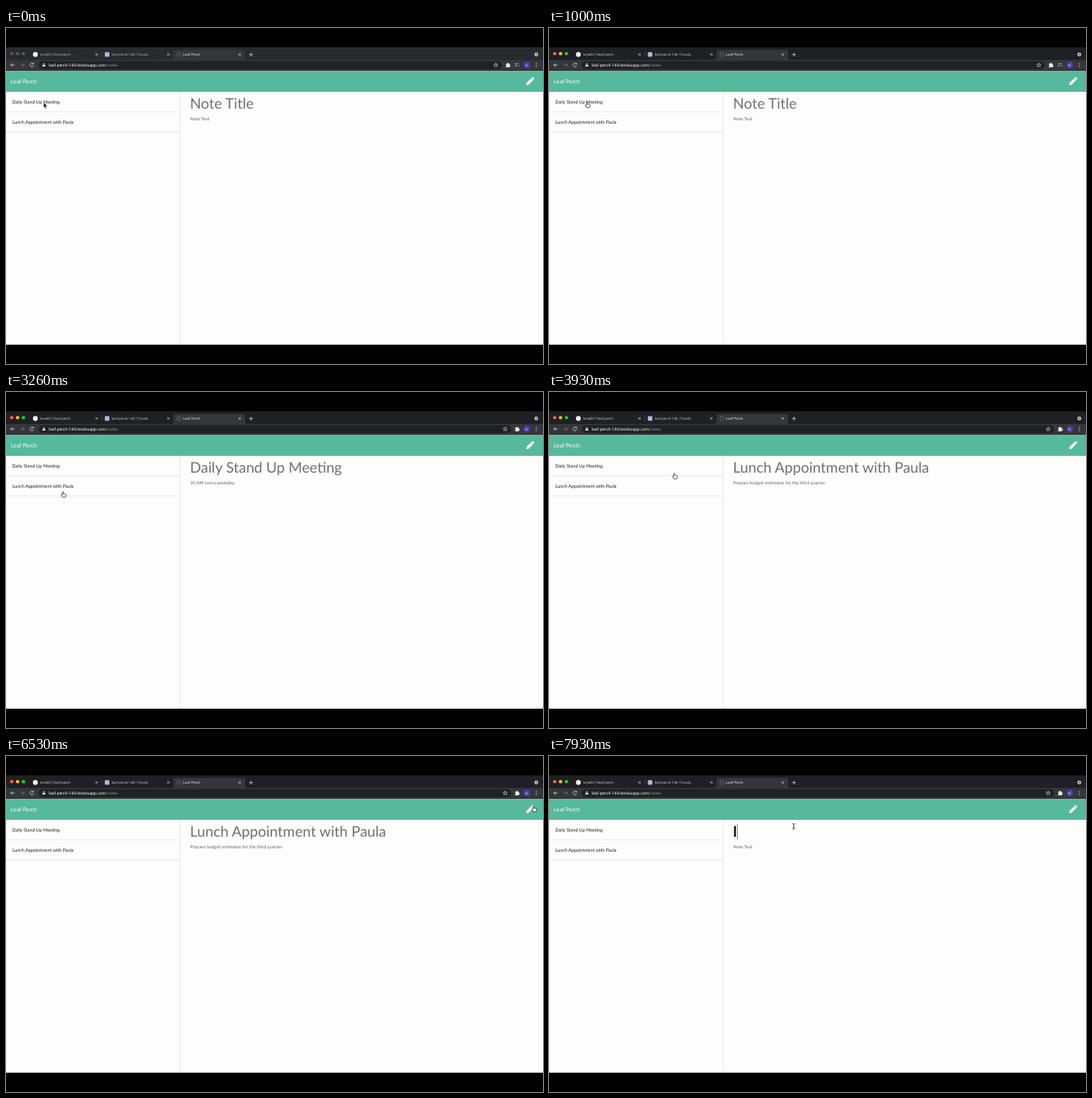
These frames come from a looping animation (640 px wide and 400 px high, 8 s). An HTML page:

```html
<!DOCTYPE html>
<html lang="en">
<head>
<meta charset="utf-8">
<title>Leaf Perch</title>
<style>
html, body { margin: 0; width: 100%; height: 100%; overflow: hidden; background: #000; }
svg { display: block; width: 640px; height: 400px; }
text { text-rendering: geometricPrecision; white-space: pre; font-family: Lato, sans-serif; }
.ui { font: 4.3px Roboto, sans-serif; fill: #bfc1c5; }
.url { font-size: 5px; fill: #f4f5f6; }
.item { font-size: 5.44px; fill: #1c1c1c; }
.title { font-size: 17.4px; fill: #707070; }
.title.typed { fill: #000; stroke: #000; stroke-width: .3; }
.note { font-size: 5.44px; fill: #686868; }
.line { fill: none; stroke: #d5d7da; stroke-width: .75; }
.asleep .strip { fill: #292a2d; }
.asleep .light { fill: #56575a; }
.asleep .ui:not(.url) { fill: #a5a7ab; }
.asleep .back { stroke: #8c8e92; }
</style>
</head>
<body>
<svg id="stage" viewBox="0 0 640 400">
  <defs>
    <clipPath id="titleBox"><rect x="208" y="76" width="432" height="23"/></clipPath>
    <g id="arrow"><path d="M-.6-2.6v6.8l1.5-1.4 1 2.4 1-.4-1-2.3h2z" fill="#000" stroke="#fff" stroke-width=".5"/></g>
    <g id="hand"><path d="M-1.2 3.3l-1.3-2.4q-.4-.9.4-1l.8.6v-3q.1-.8.7-.8t.7.8v1.7q.8-.4 1.1.2.8-.3 1.1.3.8 0 .8.8 0 1.600-.7 2.800z" fill="#fff" stroke="#111" stroke-width=".65" stroke-linejoin="round"/></g>
    <g id="beam"><path d="M-1.700-3.100q1.700 0 1.700.8 0-.8 1.700-.8M0-2.300v4.800M-1.700 3.300q1.700 0 1.700-.8 0 .8 1.700.8M-.7.9h1.400" fill="none" stroke="#222" stroke-width=".75"/></g>
  </defs>
  <rect width="640" height="400"/>
  <g id="browser"></g>
  <g id="page"></g>
  <use id="pointer"/>
</svg>
<script>
const $ = id => document.getElementById(id);
const LOOP = 8000;

const rect = (x, y, w, h, fill, more = '') =>
  `<rect x="${x}" y="${y}" width="${w}" height="${h}" fill="${fill}" ${more}/>`;
const circle = (x, y, r, fill, more = '') =>
  `<circle cx="${x}" cy="${y}" r="${r}" fill="${fill}" ${more}/>`;
const label = (x, y, cls, body, more = '') =>
  `<text x="${x}" y="${y}" class="${cls}" ${more}>${body}</text>`;
const line = (d, more = '') => `<path class="line" d="${d}" ${more}/>`;
const cross = x => line(`M${x - 1.3} 30.2l2.6 2.6m0-2.600l-2.600 2.600`);
const puzzle = x => `<path transform="translate(${x} 44)" fill="#e8eaed"
  d="M-2.300-1.500h1.300a1 1 0 0 1 2 0h1.300v1.300a1 1 0 0 1 0 2v1h-4.600v-1.300a.9.9 0 0 0 0-1.700z"/>`;
const star = x => {
  const points = Array.from({ length: 10 }, (_, i) => {
    const r = i % 2 ? 1.1 : 2.6, a = i * Math.PI / 5;
    return `${(x + r * Math.sin(a)).toFixed(2)},${(44.2 - r * Math.cos(a)).toFixed(2)}`;
  });
  return `<polygon class="line" style="stroke-width:.6" points="${points.join(' ')}"/>`;
};

$('browser').innerHTML = [
  rect(0, 23, 640, 16, '#1f2023', 'class="strip"'),
  ...['#fe5f57', '#febc2e', '#28c840'].map((c, i) => circle(6.8 + 7 * i, 30.5, 2.1, c, 'class="light"')),
  `<path d="M196 38.500q3.500 0 3.500-3v-6.500q0-3 3-3h79.500q3 0 3 3v6.500q0 3 3.500 3z" fill="#35363a"/>`,
  rect(0, 38, 640, 13.300, '#35363a'),
  circle(35, 31.5, 2.9, '#f2f2f2'),
  label(41, 33.1, 'ui', 'kmell27/leaf-perch'),
  rect(117.800, 28.800, 5.400, 5.400, '#b9b3dc', 'rx=".7"'),
  label(126, 33.1, 'ui', 'leaf-perch-144 | Tovelu'),
  circle(206, 31.5, 2.2, 'none', 'stroke="#6b6d70" stroke-width=".7"'),
  label(211, 33.1, 'ui', 'Leaf Perch', 'style="fill:#e2e4e7"'),
  ...[108, 193.5, 278.5].map(cross),
  line('M114.500 28.500v6.500', 'style="stroke:#55575b;stroke-width:.5"'),
  line('M292 29.400v4.600m-2.300-2.300h4.600'),
  circle(632, 31.5, 2.3, '#c9cbce'),
  '<path d="M630.800 30.900h2.400l-1.200 1.500z" fill="#222"/>',
  line('M10.300 44h-4.600m2-2l-2 2 2 2', 'class="line back"'),
  line('M17.200 44h4.600m-2-2l2 2-2 2', 'style="stroke:#77797d"'),
  line('M32.600 42.600a2.200 2.200 0 1 0 .4 2M33 41.500v1.500h-1.600'),
  rect(39, 39.500, 552, 9.400, '#202124', 'id="omnibox" rx="4.700"'),
  rect(43.500, 43.500, 3.200, 2.600, '#d5d7da', 'rx=".4"'),
  line('M44.200 43.500v-.6a.9.900 0 0 1 1.800 0v.6', 'style="stroke-width:.6"'),
  label(51, 45.8, 'ui url', 'leaf-perch-144.herokuapp.com<tspan fill="#8e9195">/notes</tspan>'),
  `<g id="toolsWide">${star(583.8)}${puzzle(598)}${line('M606.500 42.500h4.500m-4.500 1.500h3m-3 1.500h2m3-1.500v2', 'style="stroke:#a4a6aa"')}</g>`,
  `<g id="toolsSlim">${star(595)}${puzzle(609)}</g>`,
  circle(620.7, 44, 3.8, '#4640b8'),
  label(620.7, 45.5, 'ui', 'K', 'text-anchor="middle" style="fill:#dedcf5"'),
  ...[-1.9, 0, 1.9].map(d => circle(632, 44 + d, .55, '#d5d7da'))
].join('');

$('page').innerHTML = [
  rect(0, 51.300, 640, 325.700, '#fdfdfd'),
  rect(0, 51.300, 640, 24.700, '#57b99b'),
  label(5.8, 66, '', 'Leaf Perch', 'fill="#fff" font-size="6.8"'),
  `<path d="M620 68l.5-2.800 5.300-5.300 2.300 2.300-5.300 5.300zM626.300 59.400l.8-.7q.6-.4 1.200.1l1 1q.5.6 0 1.200l-.7.7z" fill="#fff"/>`,
  rect(0, 76, .5, 301, '#dedede'),
  rect(207.500, 76, .6, 301, '#dcdcdc'),
  rect(0, 99.600, 207.500, .6, '#dcdcdc'),
  rect(0, 123.600, 207.500, .6, '#dcdcdc'),
  label(7.5, 90, 'item', 'Daily Stand Up Meeting'),
  label(7.5, 114, 'item', 'Lunch Appointment with Paula'),
  `<g clip-path="url(#titleBox)">${label(219.3, 96.1, 'title', '', 'id="title"')}</g>`,
  label(219.4, 109.8, 'note', '', 'id="note"'),
  rect(219.300, 81, .5, 18, '#222', 'id="caret"')
].join('');

// time, title, note, caret x (0 = hidden)
const screens = [
  [0, 'Note Title', 'Note Text', 0],
  [1330, 'Daily Stand Up Meeting', '10 AM every weekday.', 0],
  [3800, 'Lunch Appointment with Paula', 'Prepare budget estimates for the third quarter.', 0],
  [6660, 'Note Title', 'Note Text', 0],
  [7260, 'Note Title', 'Note Text', 219.3],
  [7930, 'I', 'Note Text', 224.3]
];

// time, x, y, shape
const moves = [
  [0, 45.5, 91, 'arrow'], [260, 46, 93, 'hand'], [730, 46, 91.500, 'hand'],
  [1600, 185, 112, 'arrow'], [1800, 243, 101.800, 'beam'], [1930, 246, 100.500, 'beam'],
  [2400, 241, 104, 'beam'], [2530, 232, 106, 'beam'],
  [3000, 160, 115, 'hand'], [3130, 82, 123, 'hand'], [3260, 68.500, 122, 'hand'],
  [3400, 68, 120, 'hand'], [3530, 67, 114, 'hand'], [3600, 67, 112, 'hand'],
  [3930, 150, 100, 'hand'], [4060, 262, 80, 'beam'],
  [4400, 276, 86, 'beam'], [4530, 282, 89, 'beam'], [4800, 282, 95, 'beam'],
  [5000, 272, 115.700, 'beam'], [5130, 272, 113, 'beam'], [5260, 272, 111.500, 'beam'],
  [5800, 274, 109, 'beam'], [6060, 276, 107.500, 'beam'],
  [6200, 340, 99, 'beam'], [6330, 500, 78, 'beam'], [6400, 590, 66, 'arrow'],
  [6530, 629.500, 63, 'hand'],
  [7000, 560, 70, 'arrow'], [7130, 400, 80, 'beam'], [7260, 291.700, 83.700, 'beam']
];

const at = (table, t) => table.findLast(row => row[0] <= t);
const show = (id, on) => $(id).setAttribute('visibility', on ? 'visible' : 'hidden');

function draw(t) {
  const [, title, note, caretX] = at(screens, t);
  const [, x, y, shape] = at(moves, t);
  $('stage').classList.toggle('asleep', t < 60);
  $('title').textContent = title;
  $('title').classList.toggle('typed', title === 'I');
  $('note').textContent = note;
  show('caret', caretX > 0);
  $('caret').setAttribute('x', caretX);
  $('pointer').setAttribute('href', '#' + shape);
  $('pointer').setAttribute('transform', `translate(${x} ${y})`);
  const slim = t >= 3000;
  show('toolsWide', !slim);
  show('toolsSlim', slim);
  $('omnibox').setAttribute('width', slim ? 563 : 552);
}

const start = performance.now();
function tick() {
  draw((performance.now() - start) % LOOP);
  requestAnimationFrame(tick);
}
tick();
</script>
</body>
</html>
```
